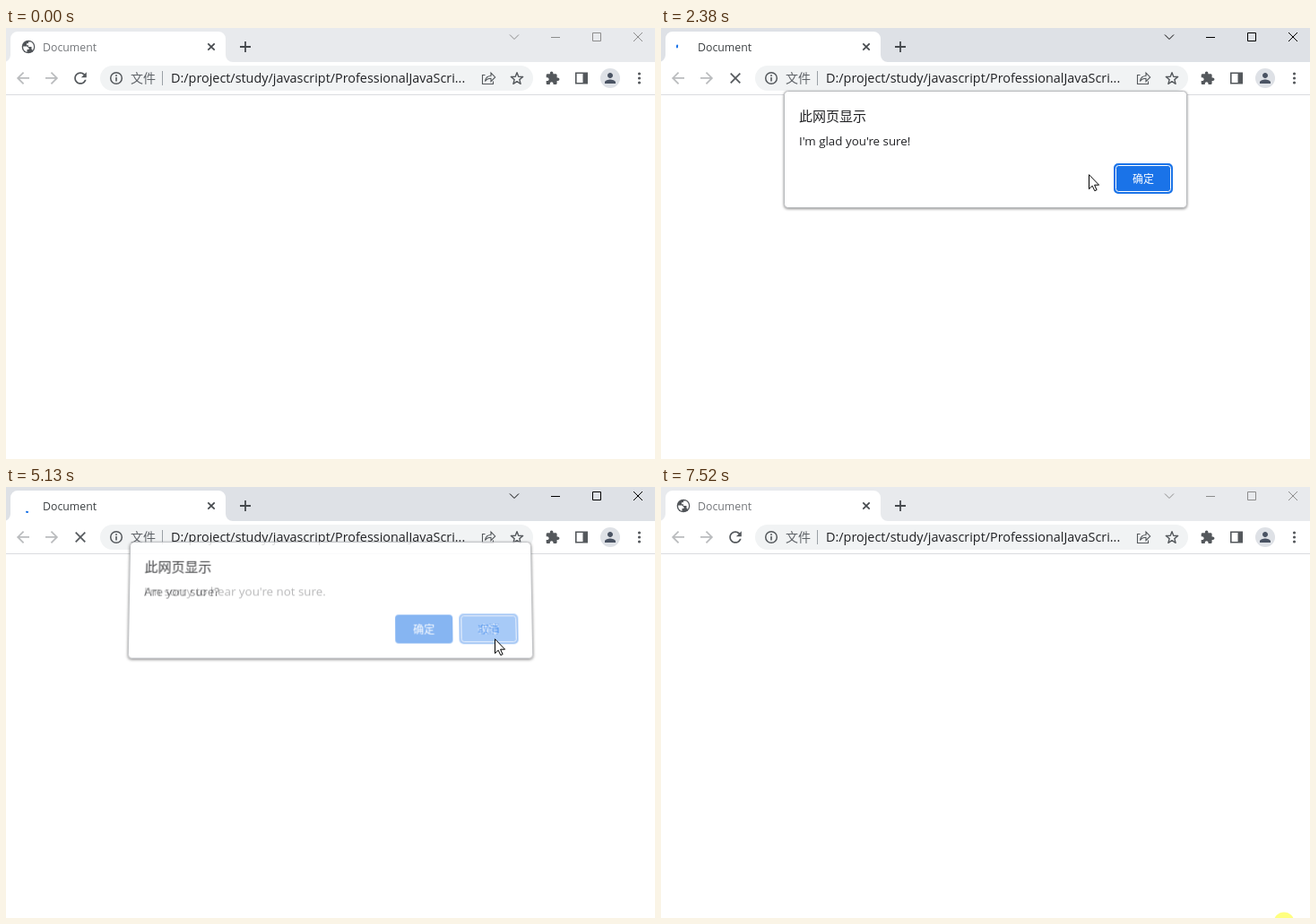
These frames come from a looping animation (724 by 481 pixels, 7630 ms). An HTML page:

```html
<!DOCTYPE html>
<html lang="zh-CN">
<head>
<meta charset="utf-8">
<title>Document</title>
<style>
  html, body { margin: 0; width: 100%; height: 100%; overflow: hidden; background: #fff; }
  svg { position: absolute; left: 0; top: 0; width: 724px; height: 481px; }
  text { font-family: "Open Sans", "Noto Sans", "Noto Sans CJK SC", "Noto Sans CJK", sans-serif; }
  .cjk { font-family: "Noto Sans CJK SC", "Noto Sans CJK", sans-serif; }
  .line { fill: none; stroke: currentColor; }
  .dialog { transform-origin: 362px 135px; overflow: visible; }
  .panel { filter: drop-shadow(0 1px 1.5px rgba(0, 0, 0, .45)); }
  #bar { fill: #e8eaed; }
  #caption { color: #8c8c8c; }
  #tabTitle { fill: #73767a; }
  .active #bar { fill: #dee1e6; }
  .active #caption { color: #000; }
  .active #tabTitle { fill: #3c4043; }
</style>
</head>
<body>
<svg id="browser" viewBox="0 0 724 481">
  <rect id="bar" width="724" height="38"/>
  <path fill="#fff" d="M-3 38a8 8 0 0 0 8-8V12a8 8 0 0 1 8-8h224a8 8 0 0 1 8 8v18a8 8 0 0 0 8 8z"/>
  <rect y="38" width="724" height="443" fill="#fff"/>
  <path stroke="#dadce0" d="M0 74.5h724"/>

  <g id="globe">
    <circle cx="25" cy="21" r="7.3" fill="#505458"/>
    <path fill="#fff" d="M19.2 20.500h4.300l2 2v1.500h-2v2.800c-2.800-.7-4.600-3.200-4.300-6.300zM25 15.500h2.800c2 1 3.200 3 3.200 5.500 0 1.500-.5 2.800-1.300 3.800l-1.200-1.300v-2.500h-3.500v-1.800h-2v-2h2z"/>
  </g>
  <path id="spinner" fill="none" stroke="#1a73e8" stroke-width="2" stroke-linecap="round"/>
  <text id="tabTitle" x="41" y="26" font-size="12.3">Document</text>
  <g color="#45494d">
    <path class="line" stroke-width="1.7" d="M225.3 17.3l7.4 7.4m0-7.4l-7.4 7.4"/>
    <path class="line" stroke-width="1.8" d="M261 21h12M267 15v12"/>
  </g>
  <g id="caption">
    <path class="line" d="M562 7.5l5 5 5-5M608 10.5h10M654.5 5.5h9v9h-9zM700 5l10 10m0-10l-10 10"/>
  </g>

  <g fill="#babcbe">
    <path id="back" transform="translate(8.4 45.4) scale(.88)" d="M20 11H7.83l5.59-5.59L12 4l-8 8 8 8 1.41-1.41L7.83 13H20v-2z"/>
    <use href="#back" transform="matrix(-1 0 0 1 70 0)"/>
  </g>
  <g fill="#54585c" color="#54585c">
    <path id="reload" transform="translate(72.8 45.8) scale(.85)" d="M17.65 6.35C16.2 4.9 14.21 4 12 4c-4.42 0-7.99 3.58-7.99 8s3.57 8 7.99 8c3.73 0 6.84-2.55 7.73-6h-2.08c-.82 2.33-3.04 4-5.65 4-3.31 0-6-2.69-6-6s2.69-6 6-6c1.66 0 3.14.69 4.22 1.78L13 11h7V4l-2.35 2.35z"/>
    <path id="stop" class="line" stroke-width="1.7" d="M77.7 50.7l10.6 10.6m0-10.6L77.7 61.3"/>
    <rect x="105" y="42" width="483" height="28" rx="14" fill="#f1f3f4"/>
    <circle class="line" cx="123" cy="56" r="6.3" stroke-width="1.5"/>
    <path class="line" stroke-width="1.6" d="M123 55v4.4M123 52.2v1.7"/>
    <text class="cjk" x="139" y="61" font-size="14" fill="#5f6368">文件</text>
    <path stroke="#9aa0a6" d="M174.5 48v16"/>
    <text x="184" y="61" font-size="14.4" fill="#202124">D:/project/study/javascript/ProfessionalJavaScri...</text>
    <path class="line" stroke-width="1.1" d="M534.5 52.5h-3v10h12v-3M534.5 59.5c.5-4 3-6 6.5-6v-3.3l4.7 4.7-4.7 4.7v-3.3c-3 0-5 1-6.5 3.2z"/>
    <path id="star" class="line" stroke-width="1.4" stroke-linejoin="round"/>
    <path transform="translate(601.3 47.7) scale(.7)" d="M20.5 11H19V7c0-1.1-.9-2-2-2h-4V3.5C13 2.12 11.88 1 10.5 1S8 2.12 8 3.5V5H4c-1.1 0-1.99.9-1.99 2v3.8H3.5c1.49 0 2.7 1.21 2.7 2.7s-1.21 2.7-2.7 2.7H2V20c0 1.1.9 2 2 2h3.8v-1.5c0-1.49 1.21-2.7 2.7-2.7 1.49 0 2.7 1.21 2.7 2.7V22H17c1.1 0 2-.9 2-2v-4h1.5c1.38 0 2.5-1.12 2.5-2.5S21.88 11 20.5 11z"/>
    <path class="line" stroke-width="1.6" d="M635.8 50.3h12.4v11.4h-12.4z"/>
    <path d="M643.5 50h5v12h-5z"/>
    <circle cx="674" cy="56" r="11" fill="#dee1e6"/>
    <path fill="#4a5363" transform="translate(665 47) scale(.75)" d="M12 12c2.21 0 4-1.79 4-4s-1.79-4-4-4-4 1.79-4 4 1.79 4 4 4zm0 2c-2.67 0-8 1.34-8 4v2h16v-2c0-2.66-5.33-4-8-4z"/>
    <circle cx="706.5" cy="51" r="1.6"/><circle cx="706.5" cy="56" r="1.6"/><circle cx="706.5" cy="61" r="1.6"/>
  </g>
</svg>
<div id="dialogs"></div>
<svg id="pointer" viewBox="0 0 724 481">
  <circle id="click" r="11.5" fill="#ff0" fill-opacity=".5"/>
  <path id="cursor" fill="#fff" stroke="#000" d="M.5.7v16l3.7-3.5 2.6 5.5 2.3-1-2.5-5.5h5z"/>
</svg>

<script>
const LOOP = 7630;
const $ = id => document.getElementById(id);
const clamp = v => Math.max(0, Math.min(1, v));
const show = (el, on) => el.setAttribute('visibility', on ? 'visible' : 'hidden');
const within = (t, [from, to]) => t >= from && t < to;

const primaryButton = x => `
  <rect class="fill" x="${x}" y="152" width="64" height="32" rx="4" fill="#1a73e8"/>
  <g class="ring" fill="none">
    <rect x="${x}" y="152" width="64" height="32" rx="4" stroke="#1a73e8" stroke-width="2"/>
    <rect x="${x + 1.5}" y="153.5" width="61" height="29" rx="3" stroke="#fff"/>
  </g>
  <circle class="ripple" cx="547" cy="174" fill-opacity=".1"/>
  <text class="cjk" x="${x + 32}" y="173" font-size="12" font-weight="500" fill="#fff" text-anchor="middle">确定</text>`;

const cancelButton = `
  <rect class="cancel" x="506.5" y="152.5" width="63" height="31" rx="4"/>
  <text class="cjk" x="538" y="173" font-size="12" fill="#1a73e8" text-anchor="middle">取消</text>`;

function makeDialog(spec) {
  $('dialogs').insertAdjacentHTML('beforeend', `
    <svg class="dialog" viewBox="0 0 724 481">
      <rect class="panel" x="137.5" y="70.5" width="449" height="130" rx="4" fill="#fff" stroke="#b9bbbe"/>
      <text class="cjk" x="154" y="104" font-size="15" fill="#202124">此网页显示</text>
      <text x="154" y="131" font-size="13.35" fill="#202124">${spec.message}</text>
      ${spec.confirm ? primaryButton(434) + cancelButton : primaryButton(506)}
    </svg>`);
  const el = $('dialogs').lastElementChild;
  return { ...spec, el, part: name => el.querySelector('.' + name) };
}

// open / close: moments when the window animation begins
const dialogs = [
  { message: 'Are you sure?', confirm: true, open: 930, close: 1990 },
  { message: "I'm glad you're sure!", open: 2020, close: 2850, hover: 2540 },
  { message: 'Are you sure?', confirm: true, open: 3870, close: 5040, hover: 3870 },
  { message: "I'm sorry to hear you're not sure.", open: 5070, close: 6480, hover: 6170 }
].map(makeDialog);

const clicks = [[420, 520], [1880, 1970], [2740, 2830], [4940, 5030], [6270, 6360], [7520, LOOP]];

// time, x, y of the pointer tip
const path = [
  [120, 633, 461], [170, 602, 400], [220, 552, 328], [270, 524, 298], [1230, 524, 298],
  [1400, 510, 258], [1530, 492, 204], [1630, 480, 177], [1730, 475, 166], [2300, 475, 164],
  [2380, 477, 163], [2480, 492, 165], [2620, 536, 169], [2740, 545, 171], [3820, 547, 171],
  [4160, 549, 169], [4940, 545, 169], [5130, 545, 169], [5240, 541, 205], [5360, 539, 241],
  [5420, 538, 245], [5800, 538, 243], [6020, 543, 205], [6170, 547, 178], [6400, 547.5, 175.5],
  [6620, 549, 180], [6760, 590, 285], [6880, 648, 410], [6960, 673, 457], [7030, 674, 458],
  [7310, 695, 486], [LOOP, 695, 486]
];

function pointerAt(t) {
  const i = path.findIndex(p => p[0] > t);
  const [t0, x0, y0] = path[Math.max(0, i - 1)], [t1, x1, y1] = path[Math.max(1, i)];
  const k = clamp((t - t0) / (t1 - t0));
  return [x0 + (x1 - x0) * k, y0 + (y1 - y0) * k];
}

// cubic-bezier(.4, 0, .2, 1)
function fastOutSlowIn(x) {
  let lo = 0, hi = 1, s = .5;
  for (let i = 0; i < 18; i++, s = (lo + hi) / 2) {
    const bx = 1.2 * s * (1 - s) ** 2 + .6 * s * s * (1 - s) + s ** 3;
    if (bx < x) lo = s; else hi = s;
  }
  return s * s * (3 - 2 * s);
}

// zero: moment when the arc is shortest, angle: its direction then
const spins = [
  { span: [880, 1655], zero: 990, angle: -79 },
  { span: [1655, 2950], zero: 2575, angle: 237 },
  { span: [3820, 4580], zero: 3885, angle: -63 },
  { span: [4580, 6560], zero: 5280, angle: 141 }
];
const ARC = 666, TURN = 1568, MAX_SWEEP = 270;

function spinnerPath(t, { zero, angle }) {
  const ratio = (t - zero) / ARC + 1, step = Math.floor(ratio);
  let sweep = MAX_SWEEP * fastOutSlowIn(ratio - step);
  if (step % 2 === 0) sweep -= MAX_SWEEP;
  if (Math.abs(sweep) < 5) sweep = sweep < 0 ? -5 : 5;
  const start = angle + (t - zero) / TURN * 360 + Math.floor(step / 2) * MAX_SWEEP;
  const at = a => `${25 + 7 * Math.cos(a * Math.PI / 180)} ${21 + 7 * Math.sin(a * Math.PI / 180)}`;
  return `M${at(start)}A7 7 0 ${+(Math.abs(sweep) > 180)} ${+(sweep > 0)} ${at(start + sweep)}`;
}

// The window tips back and lifts; on closing it fades late.
function moveWindow(el, opening, closing) {
  const lift = closing ? 21 * closing : 14.5 * (1 - opening);
  el.style.opacity = closing ? 1 - closing ** 2 : opening;
  el.style.transform = lift
    ? `translateY(${-lift}px) perspective(1000px) rotateX(${lift / 2}deg)` : 'none';
}

function drawDialog(d, t) {
  const visible = t >= d.open && t < d.close + 200;
  d.el.style.display = visible ? '' : 'none';
  if (!visible) return;
  moveWindow(d.el, clamp((t - d.open) / 180), clamp((t - d.close) / 200));
  const hovered = t >= d.hover;
  if (d.confirm) {
    const cancel = d.part('cancel');
    cancel.setAttribute('fill', hovered ? '#e9f1fd' : '#fff');
    cancel.setAttribute('stroke', hovered ? '#cbdaf3' : '#dadce0');
    show(d.part('ring'), !(hovered && t >= 4940));
  } else {
    d.part('fill').setAttribute('fill', hovered ? '#2f7ee5' : '#1a73e8');
    d.part('ripple').setAttribute('r', 8 * clamp((t - d.close + 200) / 100));
  }
}

function draw(t) {
  $('browser').classList.toggle('active', within(t, [420, 7520]));
  const spin = spins.find(s => within(t, s.span));
  show($('globe'), !spin);
  show($('reload'), !spin);
  show($('stop'), spin);
  show($('spinner'), spin);
  if (spin) $('spinner').setAttribute('d', spinnerPath(t, spin));

  dialogs.forEach(d => drawDialog(d, t));

  const [x, y] = pointerAt(t);
  $('cursor').setAttribute('transform', `translate(${Math.round(x)} ${Math.round(y)})`);
  $('click').setAttribute('cx', x);
  $('click').setAttribute('cy', y);
  show($('cursor'), t >= 120);
  show($('click'), clicks.some(c => within(t, c)));
}

$('star').setAttribute('d', 'M' + Array.from({ length: 10 }, (_, i) => {
  const r = i % 2 ? 3 : 7, a = (i / 5 - .5) * Math.PI;
  return `${570 + r * Math.cos(a)} ${56.7 + r * Math.sin(a)}`;
}).join('L') + 'z');

let origin;
function tick(now) {
  origin ??= now;
  draw((now - origin) % LOOP);
  requestAnimationFrame(tick);
}
draw(0);
requestAnimationFrame(tick);
</script>
</body>
</html>
```
